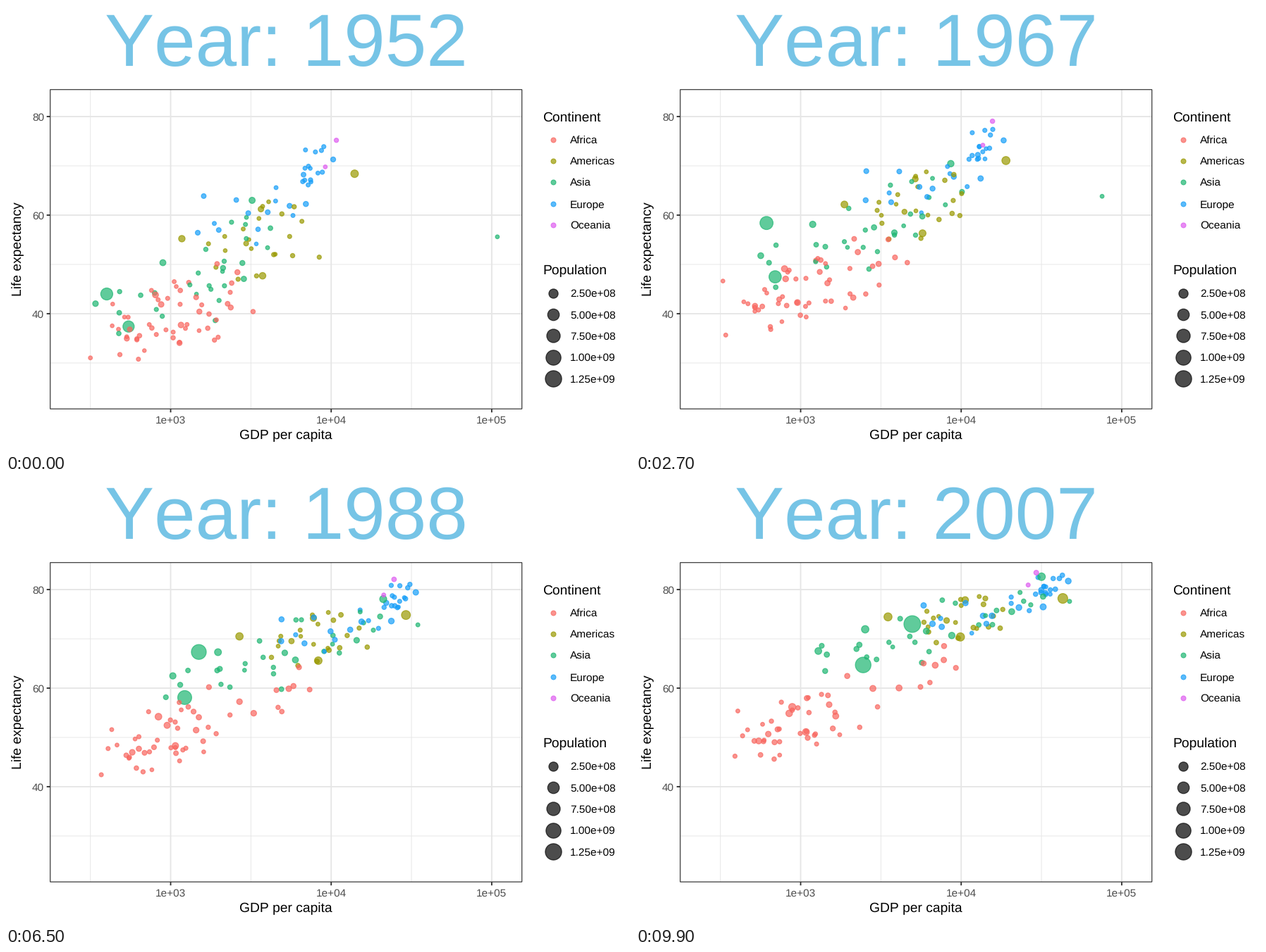
A matplotlib script that plays this animation: 885x632 px, repeating every 10 s.

```python
import matplotlib.pyplot as plt
import numpy as np
from matplotlib.animation import FuncAnimation
from matplotlib.colors import to_rgba
from matplotlib.patches import Rectangle

W, H, DPI = 885, 632, 100
FRAMES, STEP = 100, 9
PT = 72 / DPI
YEARS = np.arange(1952, 2008, 5)
SPAN = (YEARS - 1952) / 55
EASE = 1 - (1 - SPAN) ** 1.5
LEFT, TOP, RIGHT, BOTTOM = 62.7, 118.7, 731.7, 572.2
MID = (LEFT + RIGHT) / 2

COLORS = {
    "Africa": "#f8665f",
    "Americas": "#999900",
    "Asia": "#1db571",
    "Europe": "#169ef8",
    "Oceania": "#de5bf0",
}

plt.rcParams.update({
    "font.family": "Liberation Sans",
    "text.kerning_factor": 6,
    "text.hinting": "none",
})

rng = np.random.default_rng(12)


def px(log_gdp):
    return 233.5 + 227.7 * (log_gdp - 3)


def py(life):
    return 157 + 7 * (80 - life)


def radius(millions):
    return 2.49 + 9.36 * np.sqrt(np.clip(millions / 1319, 0, 1))


def dot(name, log_gdp, life, last_pop):
    pop = last_pop * 2.4 ** (SPAN - 1)
    return name, px(log_gdp), py(life), radius(pop)


def track(name, last_pop, *points):
    """One dot that moves through (year, GDP, life expectancy)."""
    year, gdp, life = np.transpose(points)
    return [dot(name, np.interp(YEARS, year, np.log10(gdp)),
                np.interp(YEARS, year, life), last_pop)]


def swarm(name, count, start, end, spread):
    """Dots that drift together; life expectancy narrows near its ceiling."""
    x, y = (a + (b - a) * EASE for a, b in zip(start, end))
    dots = []
    for _ in range(count):
        u, v = np.clip(rng.normal(size=2), -2, 2)
        v = 0.6 * u + 0.8 * v
        u = u + rng.normal(0, 0.13, len(YEARS))
        v = v + rng.normal(0, 0.08, len(YEARS))
        last_pop = np.clip(rng.lognormal(2.3, 1.2), 0.2, 220)
        dots.append(dot(name, x + spread * u, y + v * 0.9 * np.sqrt(84 - y),
                        last_pop))
    return dots


dots = [
    *track("Asia", 1319, (1952, 400, 44), (1962, 488, 44.5), (1967, 613, 58.4),
           (1977, 741, 64), (2007, 4959, 73)),
    *track("Asia", 1110, (1952, 547, 37.4), (1977, 813, 54.2), (2007, 2452, 64.7)),
    *track("Asia", 127, (1952, 3217, 63), (1977, 16610, 75.4), (2007, 31656, 82.6)),
    *track("Asia", 2.5, (1952, 108382, 55.6), (1977, 59265, 69.3),
           (1982, 31354, 71.3), (2007, 47307, 77.6)),
    *track("Americas", 301, (1952, 13990, 68.4), (2007, 42952, 78.2)),
    *swarm("Africa", 44, (2.96, 38.5), (2.98, 52), 0.24),
    *swarm("Africa", 8, (3.30, 43), (3.82, 66), 0.18),
    *swarm("Americas", 24, (3.45, 54), (3.88, 73.5), 0.21),
    *swarm("Asia", 20, (3.03, 45), (3.50, 69), 0.26),
    *swarm("Asia", 9, (3.50, 54), (4.38, 77), 0.20),
    *swarm("Europe", 19, (3.84, 67.5), (4.50, 79.5), 0.10),
    *swarm("Europe", 11, (3.47, 60.5), (4.07, 75), 0.18),
    *swarm("Oceania", 2, (4.01, 69.2), (4.46, 80.7), 0.03),
]
rng.shuffle(dots)
xs, ys, rs = (np.array([d[k] for d in dots]).T for k in (1, 2, 3))

fig = plt.figure(figsize=(W / DPI, H / DPI), dpi=DPI, facecolor="white")
ax = fig.add_axes((0, 0, 1, 1))
ax.set(xlim=(0, W), ylim=(H, 0))
ax.axis("off")


def line(x, y, color, width):
    ax.plot(x, y, color=color, lw=width * PT, solid_capstyle="butt",
            snap=False, zorder=1)


def grid(x=None, y=None, width=1.9):
    if x is not None:
        line([x, x], [TOP, BOTTOM], "#e6e6e6", width)
    else:
        line([LEFT, RIGHT], [y, y], "#e6e6e6", width)


def label(x, y, text, size=15.4, color="black", va="baseline", **kw):
    return ax.text(x, y, text, fontsize=size * PT, color=color, va=va,
                   zorder=5, **kw)


def circles(x, y, r, colors):
    rgba = [to_rgba(c, 0.7) for c in colors]
    return ax.scatter(x, y, s=(2 * np.asarray(r) * PT) ** 2, facecolors=rgba,
                      edgecolors=rgba, linewidths=1.24 * PT, snap=False,
                      zorder=3)


# Grid, ticks and frame
for k in range(3):
    grid(x=px(k + 2.5), width=0.95)
    grid(y=py(30 + 20 * k), width=0.95)
for k in range(3):
    x, y = px(3 + k), py(40 + 20 * k)
    grid(x=x)
    grid(y=y)
    line([x, x], [BOTTOM, BOTTOM + 5], "#333333", 1.9)
    line([LEFT - 5, LEFT], [y, y], "#333333", 1.9)
    label(x, 592.5, f"1e+0{3 + k}", color="#4d4d4d", ha="center")
    label(54, y + 5.5, str(40 + 20 * k), color="#4d4d4d", ha="right")
ax.add_patch(Rectangle((LEFT, TOP), RIGHT - LEFT, BOTTOM - TOP, fill=False,
                       ec="#333333", lw=1.2 * PT, snap=False, zorder=4))
label(MID, 615, "GDP per capita", 19.3, ha="center")
label(17, 345, "Life expectancy", 19.3, va="center", ha="center", rotation=90)

# Legends
label(761, 163.5, "Continent", 19.3)
label(761, 381.5, "Population", 19.3)
for k, (name, color) in enumerate(COLORS.items()):
    y = 189.7 + 30.35 * k
    circles([776], [y], [3.42], [color])
    label(800, y + 5.7, name)
for k in range(5):
    y, pop = 407.6 + 30.35 * k, 250 * (k + 1)
    circles([776], [y], [radius(pop)], ["black"])
    label(800, y + 5.7, f"{pop * 1e6:.2e}")

title = label(MID, 85.3, "", 105.3, "#76c4e6", ha="center")
cloud = circles(xs[0], ys[0], rs[0], [COLORS[d[0]] for d in dots])


def draw(i):
    k = min(i // STEP, len(YEARS) - 2)
    t = i / STEP - k
    x, y, r = (a[k] + (a[k + 1] - a[k]) * t for a in (xs, ys, rs))
    cloud.set_offsets(np.column_stack((x, y)))
    cloud.set_sizes((2 * r * PT) ** 2)
    title.set_text(f"Year: {1952 + 55 * i / (FRAMES - 1):.0f}")
    return cloud, title


anim = FuncAnimation(fig, draw, frames=FRAMES, interval=100, repeat=True,
                     repeat_delay=0)
plt.show()
```
